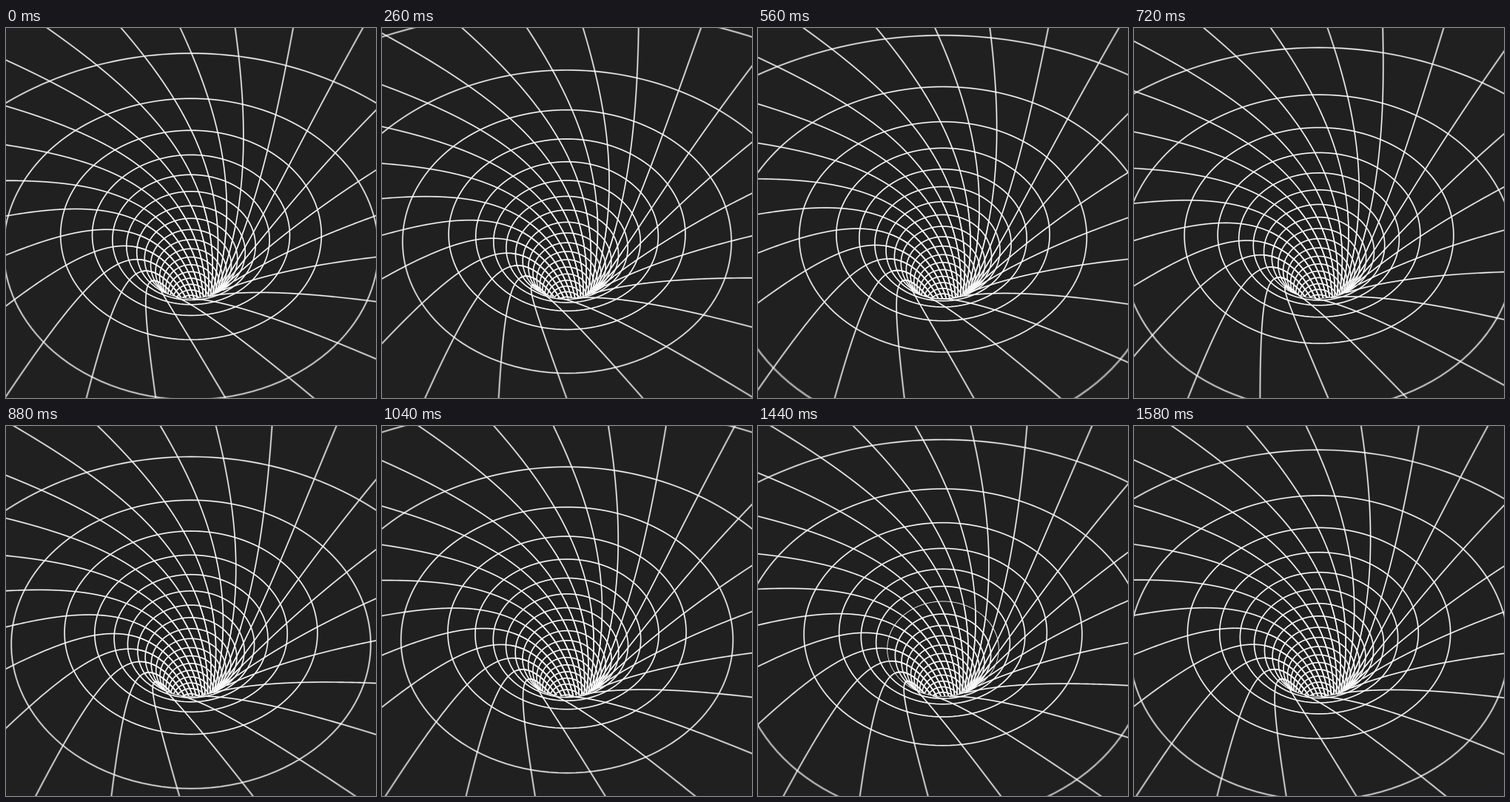
These frames come from a looping animation (500x500 px, 1600 ms). An HTML page with a canvas:

```html
<!DOCTYPE html>
<html lang="en">
<head>
<meta charset="utf-8">
<title>Funnel</title>
<style>
  html, body { margin: 0; width: 100%; height: 100%; overflow: hidden; background: #202020; }
  canvas { display: block; width: 500px; height: 500px; }
</style>
</head>
<body>
<canvas id="stage" width="500" height="500"></canvas>
<script>
const SIZE = 500, LOOP = 1600, STEP = 20;
const BACK = '#202020', LINE = '#f8f8f8';
const SHUTTER = 8, SAMPLES = 4;

// Camera: distance equals focal length, tilted above the funnel.
const DIST = SIZE / 2 / Math.tan(Math.PI / 6);
const SIN = 0.785, COS = Math.sqrt(1 - SIN * SIN);

// Funnel: ring n has radius RADIUS / n and sinks evenly with n.
const RADIUS = 675, DROP = 23.6, RIM = 102.2;
const SPOKES = 24, GAP = 2 * Math.PI / SPOKES;
const FIRST = 0.6, LIP = 7.8, LAST = 21.5, BAND = 0.1;

const stage = document.getElementById('stage').getContext('2d');
const layer = document.createElement('canvas');
layer.width = layer.height = SIZE;
const ctx = layer.getContext('2d');

// Angle phi runs clockwise from the far side.
function project(n, phi) {
  const r = RADIUS / n, z = RIM - DROP * n;
  const near = -Math.cos(phi) * r;
  const depth = DIST - z * SIN - near * COS;
  if (depth < 50) return null;
  const k = DIST / depth;
  return [SIZE / 2 + k * r * Math.sin(phi), SIZE / 2 + k * (near * SIN - z * COS)];
}

// Largest angle at which the inside of ring n still faces the camera.
function facingLimit(n) {
  const w = DROP * n, slope = w * n / RADIUS;
  const s = (SIN * DIST - RIM + 2 * w) / (slope * COS * DIST);
  return s >= 1 ? Math.PI : Math.acos(-s);
}

function trace(count, pointAt) {
  let open = false;
  for (let i = 0; i <= count; i++) {
    const p = pointAt(i / count);
    if (p) open ? ctx.lineTo(p[0], p[1]) : ctx.moveTo(p[0], p[1]);
    open = !!p;
  }
}

function traceRing(n, limit) {
  trace(160, u => project(n, limit * (2 * u - 1)));
}

function drawRing(n) {
  ctx.beginPath();
  traceRing(n, facingLimit(n));
  ctx.stroke();
}

function drawSpokes(from, to, count, turn) {
  const middle = (from + to) / 2, limit = facingLimit(middle);
  ctx.beginPath();
  for (let k = 0; k < SPOKES; k++) {
    const angle = n => (k + n / 2) * GAP + turn;
    if (Math.cos(angle(middle)) < Math.cos(limit)) continue;
    trace(count, u => {
      const n = from + (to - from) * u;
      return project(n, angle(n));
    });
  }
  ctx.stroke();
}

// Hides what lies behind the near wall of the throat.
function maskWall(from, to) {
  const half = Math.PI - facingLimit(to), count = 24;
  if (half <= 0) return;
  const point = (n, i) => project(n, Math.PI + half * (2 * i / count - 1));
  ctx.beginPath();
  for (let i = 0; i <= count; i++) ctx.lineTo(...point(from, i));
  for (let i = count; i >= 0; i--) ctx.lineTo(...point(to, i));
  ctx.fill();
}

// Hides the tube under the sheet around the throat.
function maskSheet() {
  ctx.beginPath();
  traceRing(LIP, Math.PI);
  traceRing(3, Math.PI);
  ctx.fill('evenodd');
}

function drawScene(time) {
  const u = time / LOOP, flow = (2 * u) % 1, turn = 3 * GAP * u;
  ctx.fillStyle = BACK;
  ctx.fillRect(0, 0, SIZE, SIZE);
  ctx.strokeStyle = LINE;
  ctx.lineWidth = 1.65;
  ctx.lineCap = ctx.lineJoin = 'round';

  let ring = Math.floor(LAST - flow) + flow;
  for (let n = LAST; n > LIP; n -= BAND) {
    maskWall(n - BAND, n + BAND);
    drawSpokes(n - BAND, n, 1, turn);
    if (ring > n - BAND) drawRing(ring--);
  }
  maskSheet();
  drawSpokes(FIRST, LIP, 160, turn);
  for (; ring > FIRST; ring--) drawRing(ring);
}

// Averages a few moments for a slight motion blur.
function drawFrame(time) {
  for (let i = 0; i < SAMPLES; i++) {
    drawScene(time + SHUTTER * i / (SAMPLES - 1));
    stage.globalAlpha = 1 / (i + 1);
    stage.drawImage(layer, 0, 0);
  }
}

const start = performance.now();
function tick(now) {
  const elapsed = Math.max(0, now - start) % LOOP;
  drawFrame(Math.floor(elapsed / STEP) * STEP);
  requestAnimationFrame(tick);
}
tick(start);
</script>
</body>
</html>
```
